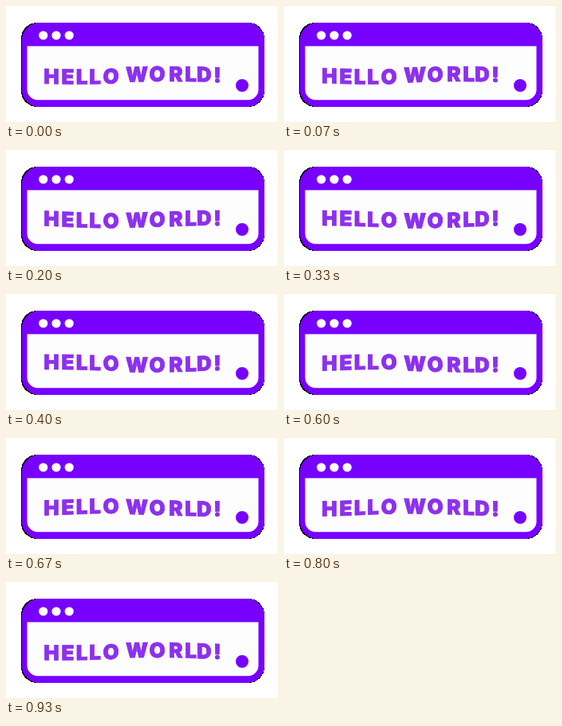
An HTML page for the animation above (0.99 s loop, 341 by 146 pixels).

```html
<!DOCTYPE html>
<html lang="en">
<head>
<meta charset="utf-8">
<style>
  html, body { margin: 0; width: 100%; height: 100%; overflow: hidden; background: #fff; }
  svg { display: block; width: 341px; height: 146px; }
  text {
    font: 900 26px Inter, "Open Sans", sans-serif; text-anchor: middle;
    fill: #8c30ee; stroke: #8c30ee; stroke-width: .7px;
  }
</style>
</head>
<body>
<svg viewBox="0 0 341 146">
  <g shape-rendering="crispEdges">
    <rect x="19" y="21" width="305" height="106" rx="20"/>
    <rect x="20" y="21" width="304" height="106" rx="22" fill="#70f"/>
  </g>
  <path d="M26.5 50.6H316.5V105A13 13 0 0 1 303.5 118.2H39.5A13 13 0 0 1 26.5 105Z" fill="#fdfdfd"/>
  <g fill="#fff">
    <circle cx="46.7" cy="37" r="5.6"/>
    <circle cx="63" cy="37" r="5.6"/>
    <circle cx="79.2" cy="37" r="5.6"/>
  </g>
  <circle cx="296" cy="100" r="8" fill="#70f"/>
  <g id="words"></g>
</svg>
<script>
  const LOOP = 990, STEPS = 15, AMPLITUDE = 1.8, BASELINE = 96.7;
  const holder = document.getElementById("words");

  const words = [
    { text: "HELLO", centers: [57, 77.5, 95, 111.5, 131.5] },
    { text: "WORLD!", centers: [164, 189.5, 213, 231.5, 248.5, 265] },
  ];

  // Each letter trails its neighbour by one step; the second word runs in antiphase.
  const letters = words.flatMap(({ text, centers }, word) =>
    [...text].map((char, i) => {
      const el = document.createElementNS("http://www.w3.org/2000/svg", "text");
      el.textContent = char;
      holder.append(el);
      return { el, x: centers[i], delay: 0.38 + word / 2 + i / STEPS };
    }));

  // Three steps per 200 ms, held for 70, 60 and 70 ms.
  function stepAt(ms) {
    const rest = ms % 200;
    return 3 * Math.floor(ms / 200) + (rest >= 70) + (rest >= 130);
  }

  function draw(now) {
    const turn = stepAt(now % LOOP) / STEPS;
    for (const { el, x, delay } of letters) {
      const phase = 2 * Math.PI * (turn - delay);
      const y = BASELINE - AMPLITUDE * Math.cos(phase);
      const slope = -0.035 * Math.sin(phase);
      el.setAttribute("transform", `matrix(1 ${slope} 0 1 ${x} ${y})`);
    }
    requestAnimationFrame(draw);
  }
  draw(performance.now());
</script>
</body>
</html>
```
